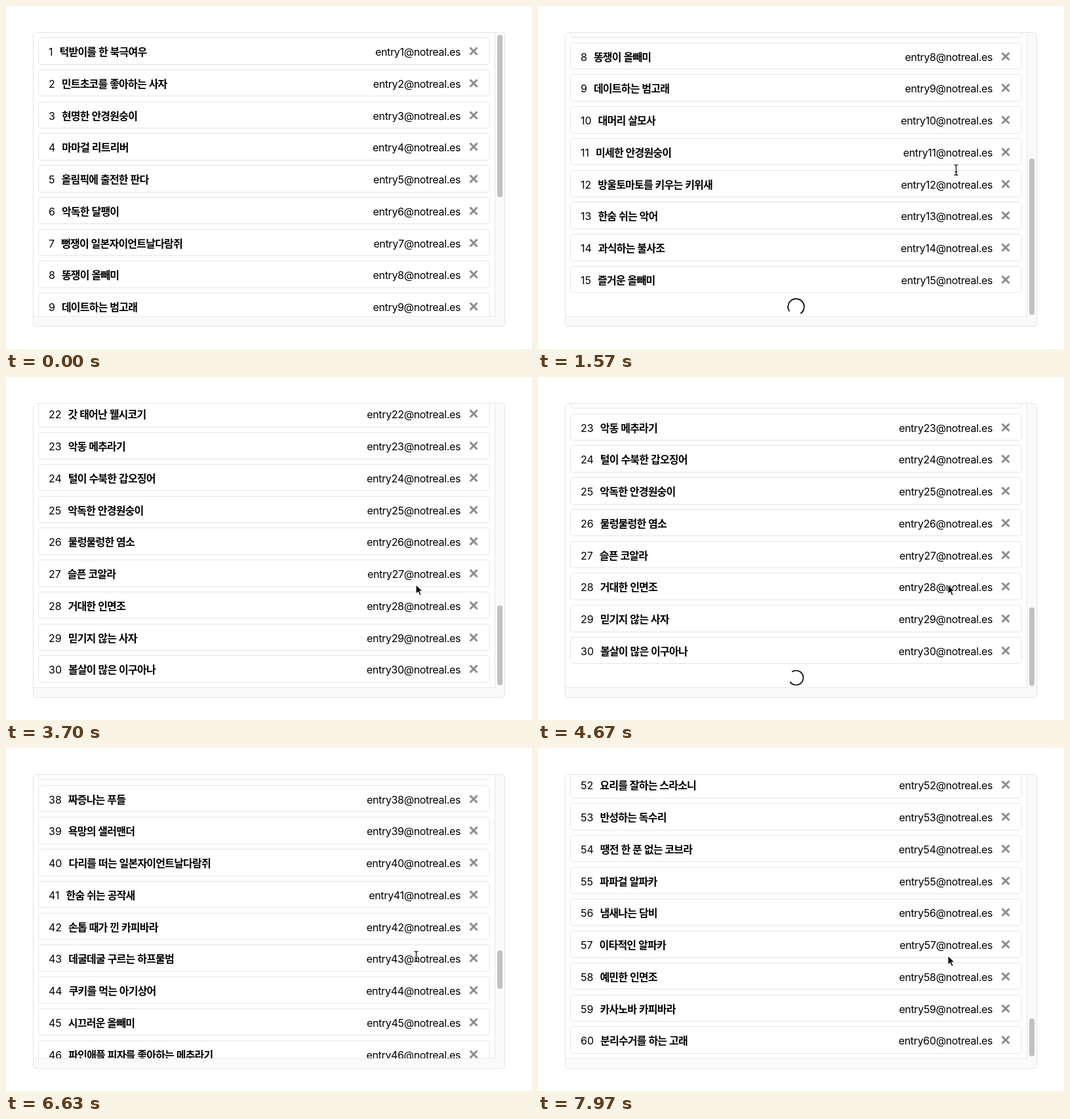
Animation, 802 px wide and 524 px high, one loop 8 s. Source, as an HTML page:

```html
<!DOCTYPE html>
<html lang="ko">
<head>
<meta charset="utf-8">
<style>
* { box-sizing: border-box; }
html, body { margin: 0; width: 100%; height: 100%; overflow: hidden; background: #fff; }
body { position: relative; font: 16px Inter, "Noto Sans CJK KR", "Noto Sans CJK", sans-serif; color: #000; }
body > *, #view > *, .row, .row > * { position: absolute; }
#panel { left: 41px; top: 40px; width: 720px; height: 450px; border: 1px solid #e4e4e4; border-radius: 5px; background: #fafafa; }
#view { left: 42px; top: 41px; width: 704px; height: 434px; overflow: hidden; background: #fff;
  border: solid #e8e8e8; border-width: 0 1px 1px 0; border-top-left-radius: 4px; }
#list { left: 7px; width: 689px; }
.row { width: 689px; height: 41.5px; border: 1px solid #e4e4e4; border-radius: 5px; line-height: 40px; white-space: nowrap; }
.who { left: 15px; top: 1px; display: flex; gap: 10px; }
.who b { margin-top: -1px; font-weight: 600; font-family: "Noto Sans CJK KR", "Noto Sans CJK", sans-serif; letter-spacing: -.78px; }
.mail { right: 44px; top: 1px; letter-spacing: -.35px; }
.row svg { left: 656px; top: 13px; }
#spin { left: 338px; width: 27px; height: 27px; border: 2px solid #111; border-bottom-color: transparent; border-radius: 50%; }
#thumb { left: 749px; width: 8px; border-radius: 4px; background: #c1c1c1; }
#cursor { left: 0; top: 0; overflow: visible; }
</style>
</head>
<body>
<div id="panel"></div>
<div id="view"><div id="list"></div><div id="spin"></div></div>
<div id="thumb"></div>
<svg id="cursor" width="1" height="1">
  <path id="arrow" d="M0 0V14.5L3.4 11.4L5.7 16.8L8.3 15.7L6 10.4H10.4Z" stroke="#fff" stroke-width="1.2"/>
  <g id="beam" fill="none">
    <path id="stem" d="M-3-8Q0-8 0-6V6Q0 8-3 8M3-8Q0-8 0-6M0 6Q0 8 3 8M-2 3H2" stroke="#fff" stroke-width="3"/>
    <use href="#stem" style="display:none"/>
    <path d="M-3-8Q0-8 0-6V6Q0 8-3 8M3-8Q0-8 0-6M0 6Q0 8 3 8M-2 3H2" stroke="#000" stroke-width="1.2"/>
  </g>
</svg>
<script>
const names = `턱받이를 한 북극여우,민트초코를 좋아하는 사자,현명한 안경원숭이,마마걸 리트리버,올림픽에 출전한 판다,악독한 달팽이,뻥쟁이 일본자이언트날다람쥐,똥쟁이 올빼미,데이트하는 범고래,대머리 살모사,미세한 안경원숭이,방울토마토를 키우는 키위새,한숨 쉬는 악어,과식하는 불사조,즐거운 올빼미,꼬질꼬질한 코끼리,잠꾸러기 판다,수줍은 고슴도치,노래하는 돌고래,배고픈 수달,용감한 다람쥐,갓 태어난 웰시코기,악동 메추라기,털이 수북한 갑오징어,악독한 안경원숭이,물렁물렁한 염소,슬픈 코알라,거대한 인면조,믿기지 않는 사자,볼살이 많은 이구아나,춤추는 너구리,게으른 사슴,아늑한 두루미,뇌절하는 페르시안 고양이,짓궂은 쿼카,일자눈썹 랩터,턱받이를 한 비둘기,짜증나는 푸들,욕망의 샐러맨더,다리를 떠는 일본자이언트날다람쥐,한숨 쉬는 공작새,손톱 때가 낀 카피바라,데굴데굴 구르는 하프물범,쿠키를 먹는 아기상어,시끄러운 올빼미,파인애플 피자를 좋아하는 메추라기,느긋한 거북이,겁많은 토끼,씩씩한 얼룩말,졸린 나무늘보,엉뚱한 오리너구리,요리를 잘하는 스라소니,반성하는 독수리,땡전 한 푼 없는 코브라,파파걸 알파카,냄새나는 담비,이타적인 알파카,예민한 인면조,카사노바 카피바라,분리수거를 하는 고래`.split(',');
const $ = id => document.getElementById(id);
const PITCH = 48.75, PAD = 7.2, VIEW = 433, PAGE = 15, SPINNER = 27.3, LOOP = 8000;
const FLICK = 130, WAIT = 1050, SPIN = 750;

$('list').innerHTML = names.map((name, i) => `<div class="row" style="top:${PAD + i * PITCH}px">
  <div class="who"><span>${i + 1}</span><b>${name}</b></div><span class="mail">entry${i + 1}@notreal.es</span>
  <svg width="14" height="14"><path d="M1.5 1.5L12.5 12.5M12.5 1.5L1.5 12.5" stroke="#8c8c8c" stroke-width="3"/></svg></div>`).join('');
const rows = [...$('list').children];

const loads = [1547, 3710, 5560];
// wheel flicks: [time, rows], stopped by the end of the list
const flicks = [[1000, 5], [1440, 9], [2900, 6], [3260, 7], [3660, 9], [5140, 9.2], [5490, 9], [7100, 6], [7550, 7], [7910, 9]];

const ease = u => (u = Math.min(1, Math.max(0, u)), u * u * (3 - 2 * u));
const mix = (a, b, u) => a + (b - a) * u;
const loadAt = t => loads.find(s => t >= s && t < s + WAIT);
const countAt = t => PAGE * (1 + loads.filter(s => t >= s + WAIT).length);
const heightAt = t => PAD + countAt(t) * PITCH + (loadAt(t) ? SPINNER : 0);

function scrollAt(t) {
  let y = 0;
  for (const [start, n] of flicks) {
    if (t < start) break;
    const end = heightAt(Math.min(t, start + FLICK)) - VIEW;
    y = Math.min(y + n * PITCH * ease((t - start) / FLICK), end);
  }
  // the turning spinner pushes the end down a little
  return y + (loadAt(t) ? 1 : 0);
}

function drawCursor(t) {
  const enter = ease((t - 500) / 480), move = ease((t - 2300) / 400);
  const x = mix(830, 637, enter) - 12 * move, y = mix(190, 249, enter) + 68 * move;
  const text = t > 900 && t < 2400 || t > 5250 && t < 7150;
  $('arrow').style.display = text ? 'none' : '';
  $('beam').style.display = text ? '' : 'none';
  $('cursor').style.transform = `translate(${x + (text ? 0.5 : 0)}px, ${y + (text ? 1.5 : 0)}px)`;
}

function draw(t) {
  const count = countAt(t), full = heightAt(t), y = scrollAt(t), load = loadAt(t);
  rows.forEach((r, i) => r.hidden = i >= count);
  $('list').style.top = -y + 'px';

  $('spin').hidden = !load;
  if (load) {
    const u = (t - load) / SPIN % 1;
    $('spin').style.top = PAD + count * PITCH - y + 'px';
    $('spin').style.transform = `rotate(${u}turn) scale(${0.8 + 0.4 * Math.abs(u - 0.5)})`;
  }

  $('thumb').style.top = 44 + y / full * VIEW + 'px';
  $('thumb').style.height = VIEW * VIEW / full - 5.5 + 'px';
  drawCursor(t);
}

const start = performance.now();
function tick() {
  draw((performance.now() - start) % LOOP);
  requestAnimationFrame(tick);
}
tick();
</script>
</body>
</html>
```
